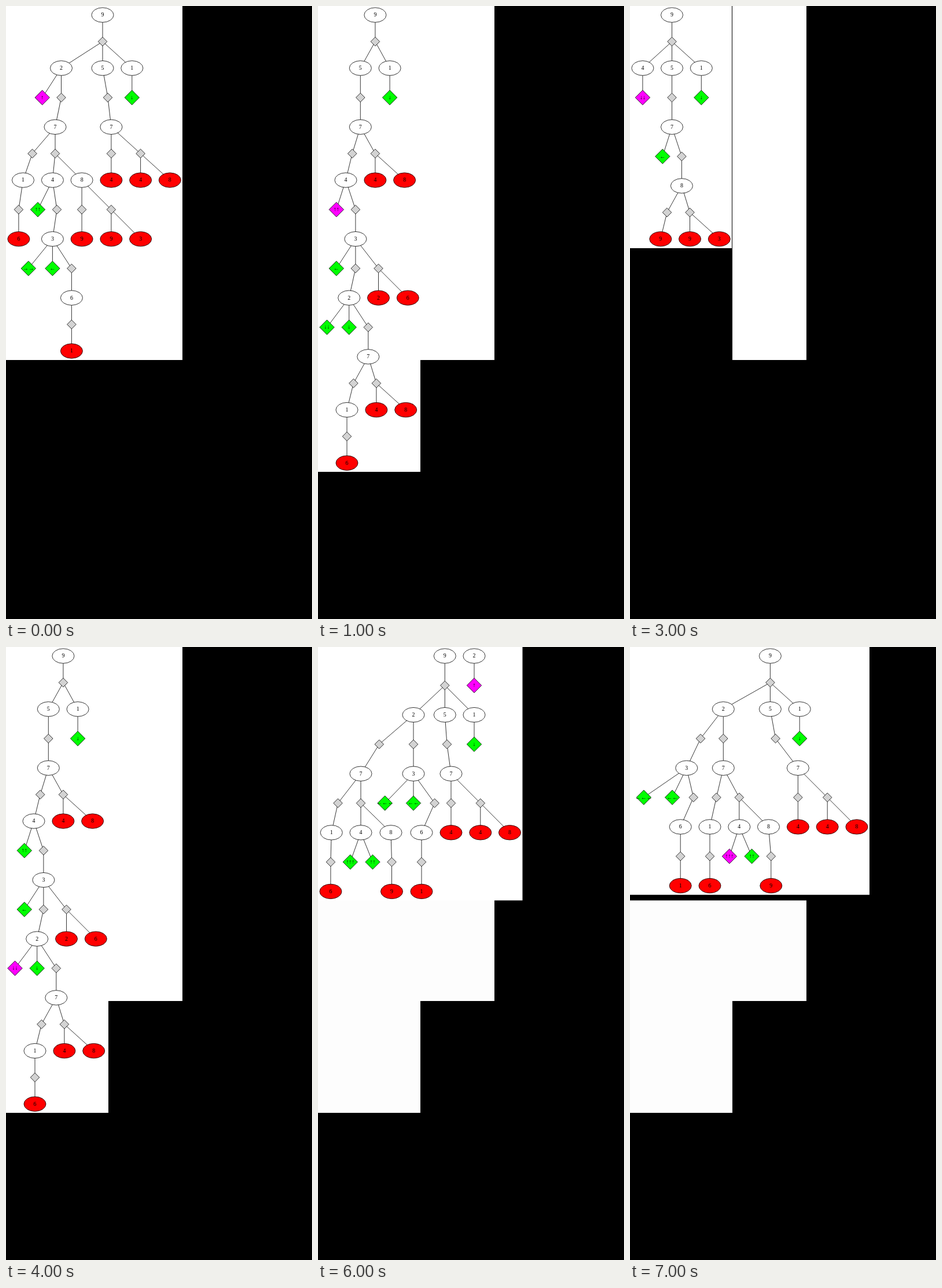
Animation of 529x1058 px, one loop 8 s. Source, as an HTML page:

```html
<!DOCTYPE html>
<html lang="en">
<head>
<meta charset="utf-8">
<title>Move tree</title>
<style>
  html, body { margin: 0; width: 100%; height: 100%; overflow: hidden; background: #000; }
  svg { display: block; width: 529px; height: 1058px; }
  .scene { visibility: hidden; animation: show 8s step-end infinite; }
  @keyframes show {
    0% { visibility: visible; }
    12.5%, 100% { visibility: hidden; }
  }
  .edge, .node { stroke: #000; stroke-width: .8; }
  text { font: 9.88px "Liberation Serif", "Times New Roman", serif; text-anchor: middle; }
</style>
</head>
<body>
<svg id="stage" viewBox="0 0 529 1058"></svg>
<script>
const PT = 0.7055;                 // pixels per layout point
const BIG = 18, SMALL = 11;        // half heights in points
const GAP = 36, MARGIN = 4;
const WHITE = '#fff', OFF = '#fdfdfd', BLACK = '#000';

// Labels: digit = ellipse, "!digit" = red ellipse, arrows = move, "" = joint
const n = (label, x, ...kids) => ({ label, x, kids });
const j = (x, ...kids) => n('', x, ...kids);

const wide = up => [
  n('9', 167, j(167,
    n('2', 95.5,
      n(up, 62.7),
      j(95.5, n('7', 85,
        j(45.5, n('1', 29.5, j(21.9, n('!6', 21.9)))),
        j(85,
          n('4', 80.4,
            n('↑↑', 55),
            j(88, n('3', 80.4,
              n('→→', 38.8),
              n('←', 80.4),
              j(113.4, n('6', 113.4, j(113.4, n('!1', 113.4))))))),
          n('8', 131.1,
            j(131.1, n('!9', 131.1)),
            j(181.9, n('!9', 181.9), n('!3', 232.6))))))),
    n('5', 167, j(176, n('7', 181.9,
      j(181.9, n('!4', 181.9)),
      j(232.6, n('!4', 232.6), n('!8', 283.3))))),
    n('1', 217.8, n('↓', 217.8))))
];

const tall = [
  n('9', 98.9, j(98.9,
    n('5', 73.3, j(73.3, n('7', 73.3,
      j(59.2, n('4', 48,
        n('↑↑', 31.8),
        j(64.9, n('3', 64.9,
          n('←', 31.8),
          j(64.9, n('2', 53.7,
            n('↓↓', 15.5),
            n('↓', 53.7),
            j(86.8, n('7', 86.8,
              j(61.4, n('1', 50, j(50, n('!6', 50)))),
              j(100.9, n('!4', 100.9), n('!8', 151.7)))))),
          j(104.5, n('!2', 104.5), n('!6', 155.3)))))),
      j(98.9, n('!4', 98.9), n('!8', 149.6))))),
    n('1', 124.1, n('↓', 124.1))))
];

const narrow = [
  n('9', 72.5, j(72.5,
    n('4', 21.9, n('↓↓', 21.9)),
    n('5', 72.5, j(72.5, n('7', 72.5,
      n('←', 56.3),
      j(89.4, n('8', 89.4,
        j(64, n('!9', 52.8)),
        j(103.5, n('!9', 103.5), n('!3', 154.3))))))),
    n('1', 123.3, n('↓', 123.3))))
];

const broad = [
  n('9', 219.3, j(219.3,
    n('2', 165,
      j(105.8, n('7', 74,
        j(34.5, n('1', 23.2, j(21.9, n('!6', 21.9)))),
        j(74,
          n('4', 74, n('↑↑↑', 55.8), n('↑↑', 94.5)),
          n('8', 126, j(127.5, n('!9', 127.5)))))),
      j(165, n('3', 165,
        n('←←←', 115.7),
        n('←←', 165),
        j(201.6, n('6', 179, j(179, n('!1', 179))))))),
    n('5', 219.3, j(223, n('7', 230,
      j(230, n('!4', 230)),
      j(280.8, n('!4', 280.8), n('!8', 331.5))))),
    n('1', 270, n('↓', 270))))
];

const broadest = [
  n('9', 242.4, j(242.4,
    n('2', 161.3,
      j(122, n('3', 97.8,
        n('←←←', 23.8),
        n('←←', 73.1),
        j(109.7, n('6', 87.2, j(87.2, n('!1', 87.2)))))),
      j(161.3, n('7', 161.3,
        j(149.4, n('1', 138, j(138, n('!6', 138)))),
        j(188.8,
          n('4', 188.8, n('↑↑↑', 171.9), n('↑↑', 210.6)),
          n('8', 239.5, j(243.8, n('!9', 243.8))))))),
    n('5', 242.4, j(251.6, n('7', 290.4,
      j(290.4, n('!4', 290.4)),
      j(341.2, n('!4', 341.2), n('!8', 392))))),
    n('1', 293.2, n('↓', 293.2))))
];

const page = (w, h, fill = WHITE) => `<rect width="${w}" height="${h}" fill="${fill}"/>`;
const base = page(305, 611);
const both = base + page(177, 804);
const faded = page(305, 611, OFF) + page(177, 804, OFF);
const cut = base + page(177, 804, BLACK);

// [background, roots, chosen move]; the first match is highlighted
const scenes = [
  [base, wide('↑'), '↑'],
  [both, tall, '↑↑'],
  [cut + page(176, 428), [n('8', 123.3, n('↓', 123.3)), ...narrow], '↓'],
  [cut + page(176, 418), narrow, '↓↓'],
  [both, tall, '↓↓'],
  [both, wide('↑↑'), '→→'],
  [faded + page(353.5, 437.4), [n('2', 270, n('↑', 270)), ...broad], '↑'],
  [faded + page(414, 437.4, BLACK) + page(414, 427.7), broadest, '←←←↑'.slice(-1).repeat(3)]
];

// Vertical centre of each row, spaced by the tallest node in it
function rowCentres(roots) {
  const ys = [];
  let y = MARGIN;
  for (let row = roots; row.length; row = row.flatMap(d => d.kids)) {
    const half = row.some(d => d.label) ? BIG : SMALL;
    ys.push((y + half) * PT);
    y += 2 * half + GAP;
  }
  return ys;
}

function diamond(x, y, half, fill) {
  const r = half * PT;
  return `<path class="node" fill="${fill}" d="M${x} ${y - r}l${r} ${r}l${-r} ${r}l${-r} ${-r}z"/>`;
}

function drawTree(roots, chosen) {
  const ys = rowCentres(roots);
  let edges = '', nodes = '', picked = false;

  function visit({ label, x, kids }, depth) {
    const y = ys[depth];
    if (!label) {
      nodes += diamond(x, y, SMALL, '#d3d3d3');
    } else {
      if (/\d/.test(label)) {
        const fill = label[0] === '!' ? '#f00' : WHITE;
        nodes += `<ellipse class="node" cx="${x}" cy="${y}" rx="${27 * PT}" ry="${BIG * PT}" fill="${fill}"/>`;
      } else {
        const hit = !picked && label === chosen;
        picked = picked || hit;
        nodes += diamond(x, y, BIG, hit ? '#f0f' : '#0f0');
      }
      nodes += `<text x="${x}" y="${y + 2.9}">${label.replace('!', '')}</text>`;
    }
    for (const kid of kids) {
      edges += `<path class="edge" d="M${x} ${y}L${kid.x} ${ys[depth + 1]}"/>`;
      visit(kid, depth + 1);
    }
  }

  roots.forEach(root => visit(root, 0));
  return edges + nodes;
}

document.getElementById('stage').innerHTML = scenes.map(([back, roots, chosen], i) =>
  `<g class="scene" style="animation-delay:${i - 8}s">${back}${drawTree(roots, chosen)}</g>`
).join('');
</script>
</body>
</html>
```
